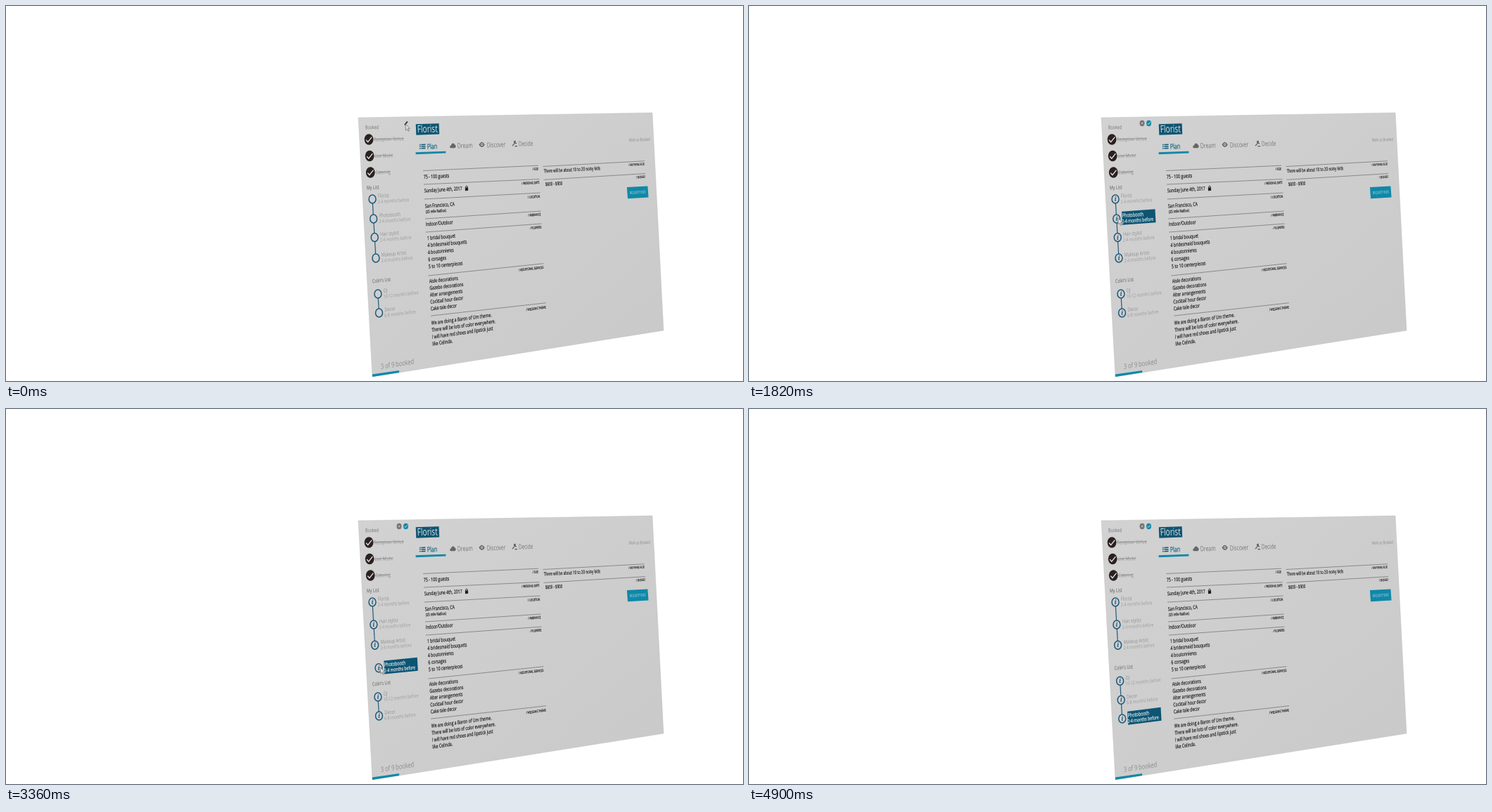
Recreate the animation shown at these times as an HTML page. Size 1048x534 px, loop 5.04 s.

```html
<!DOCTYPE html>
<html lang="en">
<head>
<meta charset="utf-8">
<title>Wedding planner</title>
<style>
html, body { margin: 0; width: 100%; height: 100%; overflow: hidden; background: #fff; }
svg { display: block; width: 100%; height: 100%; }
text { font-family: "Open Sans", "Noto Sans", sans-serif; }
</style>
</head>
<body>
<svg id="stage" viewBox="0 0 1048 534" xmlns="http://www.w3.org/2000/svg">
  <defs>
    <linearGradient id="paper" x1="0" y1="0" x2="1" y2="1">
      <stop offset="0" stop-color="#d2d2d2"/>
      <stop offset="1" stop-color="#c9c9c9"/>
    </linearGradient>
  </defs>
  <path d="M501 159 919 152 935 462 521 528Z" fill="url(#paper)" stroke="#b4b4b4" stroke-width=".4"/>
  <g id="fixed"></g>
  <g id="moving"></g>
</svg>
<script>
const LOOP = 5040, STEP = 140;
const BLUE = '#0d5573', TEAL = '#1088a8', INK = '#202020', GREY = '#777', PALE = '#9c9c9c';
const VANISH = { x: 3107, y: 115 };
const fixed = document.getElementById('fixed');
const moving = document.getElementById('moving');

// Local perspective of the tilted panel
const slope = (x, y) => (VANISH.y - y) / (VANISH.x - x);
function tilt(x, y, squeeze = .7) {
  const s = (VANISH.x - x) / (VANISH.x - 600), w = squeeze * s * s;
  return `matrix(${w} ${w * slope(x, y)} ${.053 * s} ${s} ${x} ${y})`;
}

const text = (x, y, str, size = 7.4, fill = INK, extra = '') =>
  `<text transform="${tilt(x, y)}" font-size="${size}" fill="${fill}" ${extra}>${str}</text>`;
const strong = (x, y, str, size = 7.4, fill = INK, extra = '') =>
  text(x, y, str, size, fill, `stroke="${fill}" stroke-width=".22" ${extra}`);
const path = (d, stroke, width = 1, fill = 'none') =>
  `<path d="${d}" stroke="${stroke}" stroke-width="${width}" fill="${fill}"/>`;
const shape = (d, fill) => `<path d="${d}" fill="${fill}"/>`;
const disc = (x, y, r, fill, stroke = 'none', width = 0) =>
  `<ellipse cx="${x}" cy="${y}" rx="${r * .83}" ry="${r}" fill="${fill}" stroke="${stroke}" stroke-width="${width}"/>`;
const lines = (x, y, gap, list) =>
  list.map((str, i) => strong(x + i * .53, y + i * gap, str)).join('');

const section = (x1, y1, x2, y2, label, labelY) =>
  path(`M${x1} ${y1}L${x2} ${y2}`, '#5c5c5c', .6) +
  strong(x2, labelY, '/ ' + label, 5.2, INK, 'text-anchor="end"');

function drawFixed() {
  const booked = ['Reception Venue', 'Live Music', 'Catering'].map((str, i) => {
    const x = 516 + i * 1.1, y = 190 + i * 23.5;
    return disc(x, y, 7.7, '#2b2120') +
      path(`M${x - 4} ${y + .6}l2.6 3 5.6 -7`, '#e2e2e2', 1.4) +
      text(x + 7.3, y + 2.6, str, 7.3, '#8b8b8b', 'text-decoration="line-through"');
  }).join('');

  const tabs =
    [0, 1, 2].map(i => path(`M588 ${197.4 + i * 2.7}h1.5m1 0l6 -.2`, BLUE, 1.5)).join('') +
    strong(599, 203.7, 'Plan', 10.2, '#176582') +
    shape('M582.5 208.2 625.3 206.7 625.5 209.5 582.7 211.2Z', TEAL) +
    shape('M632.8 202.3c-2.4-.5-1.8-3.6.2-3.7c.5-4 4.2-4 5-1.2c2.2.2 2.2 4.6-.2 4.8Z', '#666') +
    text(642, 202.6, 'Dream', 10.2, GREY) +
    shape('M672.5 197.5q4 -7.5 8.3 -.3q-4 7.5 -8.3 .3Z', '#666') +
    disc(676.7, 197.3, 2, '#d0d0d0') + disc(676.7, 197.3, 1, '#666') +
    text(684, 201.4, 'Discover', 10.2, GREY) +
    path('M722 192.6l3.8 3.6M720 199.2l3.6 -4M723.5 199.7h3.5', '#555', 1.2) +
    path('M724.5 192l-1.8 2.7', '#555', 1.6) +
    text(729, 199.6, 'Decide', 10.2, GREY);

  fixed.innerHTML =
    text(511, 175.5, 'Booked', 7.2, '#737373') + booked +
    text(513, 261.5, 'My List', 7.2, '#5c5c5c') +
    text(533, 517, '3 of 9 booked', 10.1, '#8b8b8b') +
    shape('M520.8 524.4 559 519 559.2 521.9 521 528Z', TEAL) +
    shape('M582.7 168.2 615.6 167.3 616.2 182.6 583.3 183.8Z', BLUE) +
    text(585, 180.3, 'Florist', 14.3, '#e4e4e4') + tabs +
    text(886, 193, 'Mark as Booked', 7.3, '#8a8a8a') +
    section(593, 234.5, 757, 227.2, 'SIZE', 233.7) +
    strong(594, 246, '75 - 100 guests') +
    section(594, 254, 758.5, 246.5, 'WEDDING DATE', 253) +
    strong(595, 265.5, 'Sunday June 4th, 2017') +
    shape('M652.8 258.5 657 258.2 657.2 262.8 653 263.2Z', INK) +
    path('M653.7 258.5v-1.5q1.3 -2.4 2.5 0v1.5', INK, .9) +
    section(595, 275, 759.5, 266, 'LOCATION', 272.8) +
    strong(596, 287.5, 'San Francisco, CA') +
    strong(597, 295, '(25 mile Radius)', 5.6) +
    section(596, 303, 760.5, 292, 'AMBIANCE', 298.3) +
    strong(597, 313.3, 'Indoor/Outdoor') +
    section(597, 322, 761.5, 310, 'FLOWERS', 316.5) +
    lines(599, 333.2, 10.1, ['1 bridal bouquet', '4 bridesmaid bouquets', '4 boutonnieres', '6 corsages', '5 to 10 centerpieces']) +
    section(600.5, 384, 764.5, 366.7, 'ADDITIONAL SERVICES', 373.8) +
    lines(602, 394.5, 9.8, ['Aisle decorations', 'Gazebo decorations', 'Alter arrangements', 'Cocktail hour decor', 'Cake tale decor']) +
    section(604, 441.2, 768, 422.7, 'WEDDING THEME', 430.5) +
    lines(605, 454, 9.9, ['We are doing a Baron of Um theme.', 'There will be lots of color everywhere.', 'I will have red shoes and lipstick just', 'like Celinda.']) +
    section(763.5, 228.5, 908, 220.7, 'ANYTHING ELSE', 226.7) +
    strong(765, 237.5, 'There will be about 10 to 20 noisy kids') +
    section(764.5, 247.4, 909, 238.6, 'BUDGET', 244.8) +
    strong(767, 256.3, '$800 - $900') +
    path('M884 259 911.5 257.5 912.5 271.5 885 273.2Z', TEAL, 2, TEAL) +
    text(887, 268, 'REQUEST BIDS', 6.2, '#bfe0ea');
}

// Linear value between [time, value] keys
function at(t, keys) {
  if (t <= keys[0][0]) return keys[0][1];
  for (let i = 1; i < keys.length; i++) {
    const [t0, v0] = keys[i - 1], [t1, v1] = keys[i];
    if (t <= t1) return v0 + (v1 - v0) * (t - t0) / (t1 - t0);
  }
  return keys[keys.length - 1][1];
}

const railX = y => 521 + (y - 275) * .0585;
const rail = (y1, y2) => path(`M${railX(y1)} ${y1}L${railX(y2)} ${y2}`, '#245a78', 1.2);

function item(y, name, when, editing, dx = 0, held = false) {
  const x = railX(y) + dx, left = x + 7.3, w = 47.5;
  const rise = slope(x, y) * w;
  const box = held
    ? shape(`M${left} ${y - 10.3}l${w} ${rise}l1 19l${-w} ${-rise}Z`, BLUE) : '';
  const write = held ? strong : text;
  return box + disc(x, y, 6, '#cfcfcf', '#1d587a', 1.5) +
    (editing ? `<text x="${x}" y="${y + 3}" font-size="8.5" font-weight="bold" font-style="italic" text-anchor="middle" fill="#1d587a" style="font-family:'Noto Serif',serif">i</text>` : '') +
    write(left + .8, y - 1.9, name, 7.4, held ? '#dce6ea' : '#929292') +
    write(left + .5, y + 6.2, when, 7, held ? '#dce6ea' : PALE);
}

function toolbar(editing) {
  if (!editing) return path('M567 169.5l3.8 -5', '#333', 2);
  return disc(559, 167, 4.2, '#747474') + path('M557.7 165.6l2.6 2.8m0 -2.8l-2.6 2.8', '#ccc', .8) +
    disc(568.5, 167, 4.2, TEAL) + path('M566.6 167l1.4 1.6 2.6 -3.2', '#ddd', .9);
}

const cursor = (x, y) =>
  path(`M${x} ${y}l.5 9 2 -1.8 1.6 3.2 1.3 -.7 -1.5 -3.1 2.5 -.3Z`, '#666', .7, '#dedede');

function draw(t) {
  const editing = t >= 280, held = t >= 1820;
  const dragY = at(t, [[1820, 303], [2240, 320.8], [3360, 368.8], [4200, 405], [4900, 441]]);
  const dragX = at(t, [[1820, 0], [2240, .4], [3360, 3.5], [4200, 4.4], [4900, 0]]);
  const swap = at(t, [[2100, 0], [2380, 1]]);
  const lift = at(t, [[3640, 0], [3920, 22.7]]);
  const hair = 329.5 - 22.5 * swap, makeup = 359 - 22.7 * swap;
  const dj = 410 - lift, decor = 437 - lift;
  const soon = '2-4 months before';

  const cx = held ? railX(dragY) + dragX + 2 : at(t, [[230, 568], [840, 546.5], [1400, 528.5], [1680, 525]]);
  const cy = held ? dragY - 1 : at(t, [[230, 168], [840, 231], [1400, 289], [1680, 302]]);

  moving.innerHTML = toolbar(editing) +
    rail(275, makeup) + rail(dj, lift ? Math.max(437, dragY) : decor) +
    item(275, 'Florist', soon, editing) +
    item(hair, 'Hair stylist', soon, editing) +
    item(makeup, 'Makeup Artist', soon, editing) +
    text(521 - lift * .05, 394.5 - lift, "Colin's List", 7.2, '#5c5c5c') +
    item(dj, 'DJ', '10-12 months before', editing) +
    item(decor, 'Decor', '6-8 months before', editing) +
    item(dragY, 'Photobooth', soon, editing, dragX, held) +
    (t < 4060 ? cursor(cx, cy) : '');
}

drawFixed();
const start = performance.now();
let shown = -1;
function tick() {
  const t = Math.floor(((performance.now() - start) % LOOP) / STEP) * STEP;
  if (t !== shown) draw(shown = t);
  requestAnimationFrame(tick);
}
tick();
</script>
</body>
</html>
```
